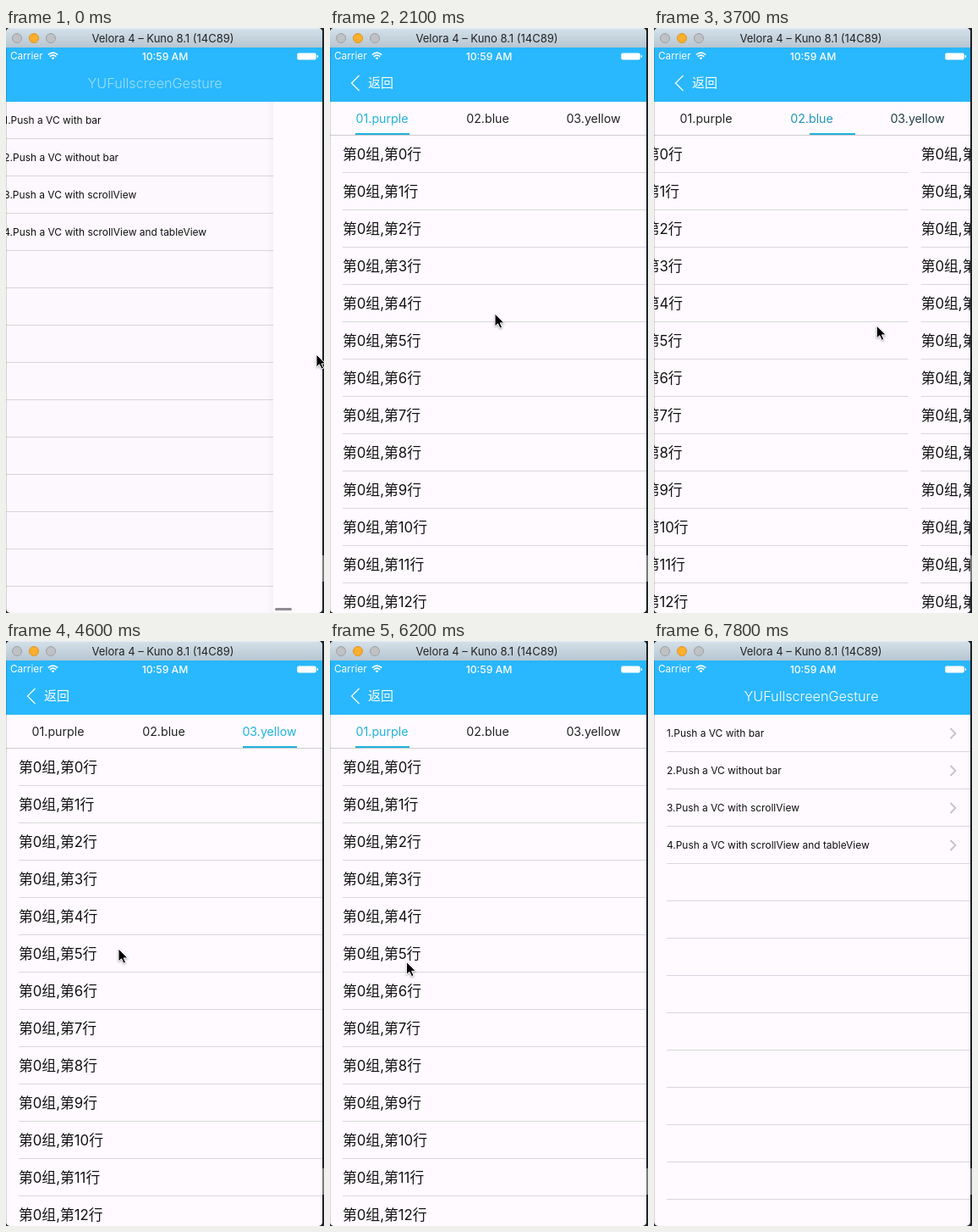
Animation, 376 px wide and 690 px high, one loop 7.9 s. Source, as an HTML page:

```html
<!DOCTYPE html>
<html lang="zh">
<head>
<meta charset="utf-8">
<title>Gesture demo</title>
<style>
html, body { margin: 0; width: 100%; height: 100%; overflow: hidden; background: #1c2127; }
body { font-family: Inter, "Noto Sans CJK SC", "Noto Sans CJK", sans-serif; color: #111; }
div, svg, span { position: absolute; box-sizing: border-box; white-space: nowrap; }
#stage { left: 0; top: 0; width: 376px; height: 690px; overflow: hidden; background: #1c2127; }
#side { left: 374px; top: 622px; width: 2px; height: 31px; background: #77797c; }
#window { left: 0; top: 0; width: 374px; height: 690px; overflow: hidden; border-radius: 5px; background: #fefaff; }
#titlebar { left: 0; top: 0; width: 374px; height: 23px; background: linear-gradient(#d3e0e9, #b7c6d1); border-top: 1px solid #e4edf3; }
#titlebar span { left: 0; width: 371px; top: 0; line-height: 22px; text-align: center; font-size: 13px; color: #222; }
.light { top: 5px; width: 12px; height: 12px; border-radius: 50%; background: #bfc1c4; border: 1px solid #9da1a6; }
#bar { left: 0; top: 23px; width: 374px; height: 64px; background: #29b7fd; color: #fff; z-index: 3; }
#carrier { left: 5px; top: 2px; font-size: 11.8px; line-height: 17px; }
#clock { left: 1px; width: 374px; top: 2px; text-align: center; font-size: 12.2px; font-weight: 500; line-height: 17px; }
#title { left: 0; width: 372px; top: 30px; text-align: center; font-size: 16.2px; font-weight: 300; line-height: 24px; }
#back { left: 0; top: 29px; width: 100px; height: 26px; }
#back span { left: 45px; top: 0; font-size: 15px; font-weight: 300; line-height: 26px; }
#list, #page { left: 0; top: 87px; width: 375px; height: 603px; }
.row { left: 0; width: 375px; height: 44px; line-height: 44px; padding-left: 15px; font-size: 11.95px; }
.row::after { content: ""; position: absolute; left: 15px; right: 0; bottom: 0; height: 1px; background: #dad7db; }
.row svg { left: 349px; top: 15px; }
#dim { left: 0; top: 87px; width: 375px; height: 603px; background: #002a10; }
#page { background: #fefaff; }
#shade { left: -8px; top: 0; width: 8px; height: 603px; background: linear-gradient(to right, transparent, rgba(0,0,0,.28)); }
#tabs { left: 0; top: 0; width: 375px; height: 40px; background: #fefaff; border-bottom: 1px solid #cfccd0; }
#tabs span { width: 125px; top: 0; line-height: 39px; font-size: 14.2px; text-align: center; }
#line { top: 37px; height: 2px; background: #20b2dc; }
#pager { left: 0; top: 40px; width: 375px; height: 563px; overflow: hidden; }
#strip { left: 0; top: 0; width: 1125px; height: 563px; }
.table { top: 0; width: 375px; height: 563px; }
.table .row { font-size: 16.8px; }
#thumb { left: 2px; top: 597px; width: 20px; height: 3px; border-radius: 2px; background: #8f8c91; }
#cursor { left: -2px; top: -2px; z-index: 5; filter: drop-shadow(0 1px 1px rgba(0,0,0,.35)); }
#edge { left: 0; top: 23px; width: 1px; height: 667px; background: rgba(0,0,0,.15); z-index: 4; }
</style>
</head>
<body>
<div id="stage">
  <div id="side"></div>
  <div id="window">
    <div id="list"></div>
    <div id="dim"></div>
    <div id="page">
      <div id="shade"></div>
      <div id="content">
        <div id="pager"><div id="strip"></div></div>
        <div id="tabs"><div id="line"></div></div>
      </div>
      <div id="thumb"></div>
    </div>
    <div id="bar">
      <span id="carrier">Carrier</span>
      <svg style="left:49px;top:5px" width="13" height="10" fill="none" stroke="#fff" stroke-width="1.6">
        <path d="M.8 3.6Q6.5-1.4 12.2 3.6M2.8 5.9Q6.5 2.5 10.2 5.9"/>
        <path d="M6.5 9.3L4.6 7.4Q6.5 5.8 8.4 7.4Z" fill="#fff" stroke="none"/>
      </svg>
      <span id="clock">10:59 AM</span>
      <svg style="left:344px;top:6px" width="26" height="9" fill="#fff">
        <rect x=".3" y=".5" width="22.4" height="8" rx="1.8"/><rect x="23.6" y="3" width="1.5" height="3" rx=".7"/>
      </svg>
      <span id="title">YUFullscreenGesture</span>
      <div id="back">
        <svg style="left:24px;top:3px" width="12" height="20" fill="none" stroke="#fff" stroke-width="1.2">
          <path d="M10.5 1L1.5 10L10.5 19"/>
        </svg>
        <span>返回</span>
      </div>
    </div>
    <div id="titlebar">
      <div class="light" style="left:7px"></div>
      <div class="light" style="left:27px;background:#fcaf2c;border-color:#dd9423"></div>
      <div class="light" style="left:47px"></div>
      <span>Velora 4 – Kuno 8.1 (14C89)</span>
    </div>
    <div id="edge"></div>
  </div>
  <svg id="cursor" width="18" height="24">
    <path d="M2 2V17L5.5 13.8L8 19.2L10.6 18.1L8.2 12.9H13Z" fill="#000" stroke="#fff" stroke-width="1"/>
  </svg>
</div>
<script>
const LOOP = 7900, STEP = 100, W = 375, ROW = 44, TAB = 125;
const $ = id => document.getElementById(id);

function add(parent, tag, cls, text, style) {
  const el = document.createElement(tag);
  el.className = cls;
  el.textContent = text;
  Object.assign(el.style, style);
  parent.append(el);
  return el;
}

const chevron = '<svg width="10" height="14" fill="none" stroke="#c4c2c7" stroke-width="1.8"><path d="M1.5 1L7.5 7L1.5 13"/></svg>';
const items = ["bar", "out bar", " scrollView", " scrollView and tableView"].map((end, i) =>
  `${i + 1}.Push a VC with${i ? "" : " "}${end}`);
for (let i = 0; i < 14; i++) {
  const row = add($("list"), "div", "row", items[i] || "", { top: i * ROW + "px" });
  if (items[i]) row.insertAdjacentHTML("beforeend", chevron);
}

for (let p = 0; p < 3; p++) {
  const table = add($("strip"), "div", "table", "", { left: p * W + "px" });
  for (let i = 0; i < 13; i++) add(table, "div", "row", `第0组,第${i}行`, { top: i * ROW + "px" });
}

const tabs = ["01.purple", "02.blue", "03.yellow"].map((name, i) =>
  add($("tabs"), "span", "", name, { left: i * TAB - 1 + "px" }));
const tabWidth = i => 64 - 13 * (1 - Math.abs(i - 1));

const mix = (a, b, k) => a + (b - a) * k;
const clamp = v => Math.max(0, Math.min(1, v));
const part = (t, from, to) => clamp((t - from) / (to - from));
const smooth = (t, from, to) => {
  const k = part(t, from, to);
  return k * k * (3 - 2 * k);
};

const DRAG = 6600; // start of the closing drag
const swipes = [
  { from: 2200, to: 2800, dir: 1 }, { from: 3500, to: 4200, dir: 1 },
  { from: 4700, to: 5300, dir: -1 }, { from: 5600, to: 6200, dir: -1 },
];
// Places where the pointer rests between gestures
const rests = [
  { t: 0, x: 367, y: 385 }, { t: 1100, x: 220, y: 248 }, { t: 2100, x: 195, y: 337 }, { t: 2900, x: 229, y: 341 },
  { t: 4600, x: 133, y: 363 }, { t: 5400, x: 106, y: 374 }, { t: DRAG, x: 85, y: 380 },
];

const sum = (list, fn) => list.reduce((total, item) => total + fn(item), 0);

function pageX(t) {
  if (t < 500) return mix(316, W, smooth(t, 0, 500));
  return W * (1 - smooth(t, 1200, 1700) + smooth(t, DRAG, DRAG + 1050));
}

const tabAt = t => sum(swipes, s => s.dir * smooth(t, s.from, s.to));

// Each swipe reaches out to one side, pulls across and comes back
const swing = t => sum(swipes, s => s.dir * 80 * Math.sin(2 * Math.PI * part(t, s.from, s.to)));

function pointer(t) {
  const move = axis => rests.slice(1).reduce((v, r, i) =>
    v + (r[axis] - rests[i][axis]) * smooth(t, rests[i].t, r.t), rests[0][axis]);
  return [move("x") + swing(t) + (t > DRAG ? pageX(t) : 0), move("y")];
}

const moveX = (id, x) => $(id).style.transform = `translateX(${x}px)`;

function draw(t) {
  const x = pageX(t), open = 1 - x / W, dark = open ** 1.5;
  moveX("page", x);
  moveX("list", -.3 * W * open);
  $("dim").style.opacity = .125 * dark;
  $("shade").style.opacity = x > 0 ? clamp(dark * 1.8) : 0;
  moveX("title", -63 * open);
  $("title").style.opacity = clamp(1 - open / .35);
  $("back").style.opacity = clamp(open * 3 - 2);

  const plain = t < 600;
  $("content").style.display = plain ? "none" : "block";
  $("thumb").style.display = plain ? "block" : "none";

  const s = tabAt(t), width = tabWidth(s);
  moveX("strip", -W * s);
  $("line").style.width = width + "px";
  $("line").style.left = 61.5 + TAB * s - width / 2 + "px";
  tabs.forEach((tab, i) => {
    const k = clamp(1 - Math.abs(s - i));
    tab.style.color = `rgb(${mix(34, 32, k)},${mix(34, 178, k)},${mix(34, 220, k)})`;
  });

  const [cx, cy] = pointer(t);
  $("cursor").style.transform = `translate(${cx}px,${cy}px)`;
}

const start = performance.now();
function tick() {
  const t = (performance.now() - start) % LOOP;
  draw(Math.floor(t / STEP) * STEP);
  requestAnimationFrame(tick);
}
tick();
</script>
</body>
</html>
```
